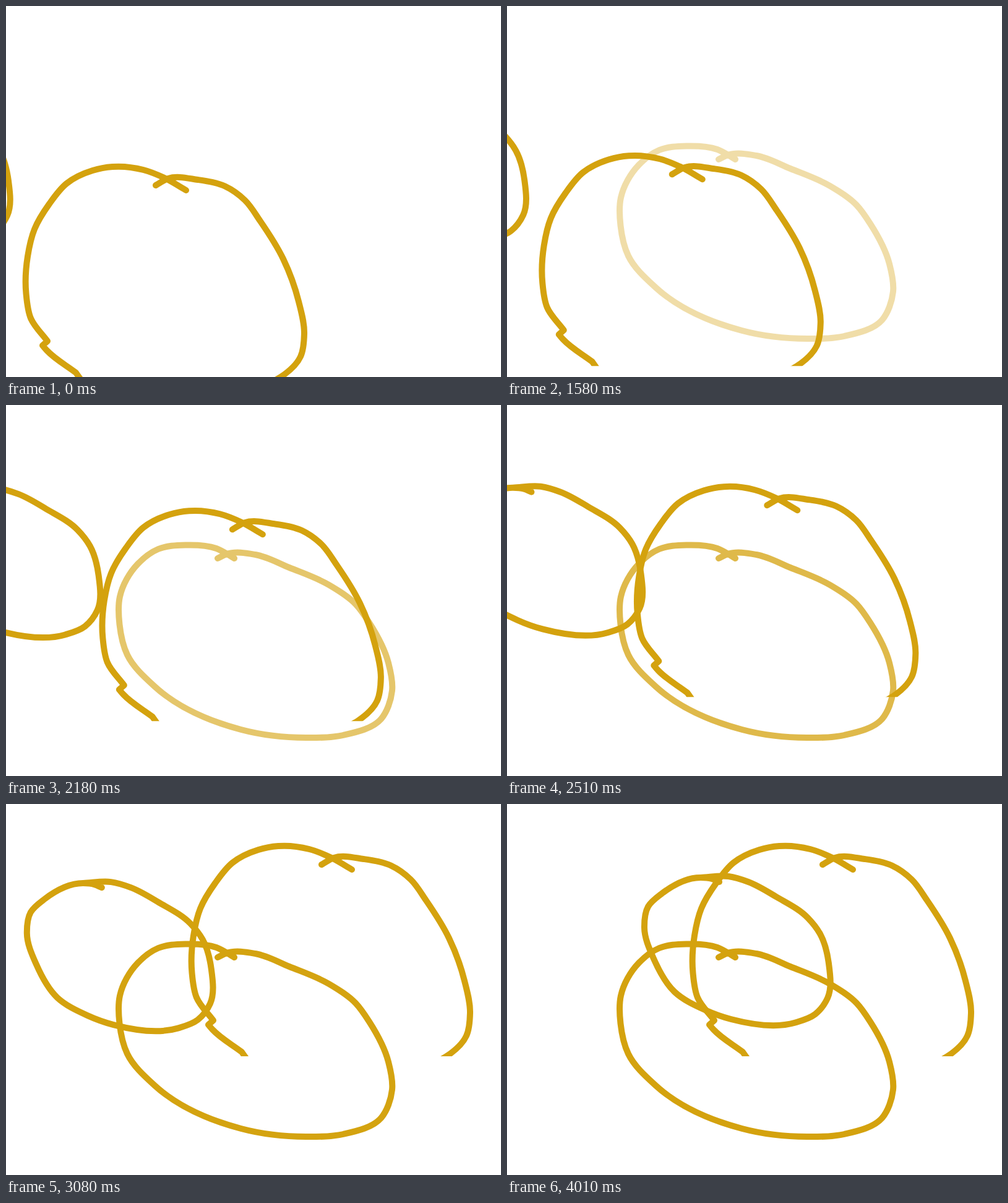
Animation of 800 by 600 pixels, one loop 4640 ms. Source, as an HTML page:

```html
<!DOCTYPE html>
<html lang="en">
<head>
<meta charset="utf-8">
<title>Three loops</title>
<style>
  html, body { margin: 0; width: 100%; height: 100%; overflow: hidden; background: #fff; }
  svg { display: block; width: 100%; height: 100%; }
  path { fill: none; stroke: #d4a20e; stroke-width: 10; stroke-linecap: round; stroke-linejoin: round; }
</style>
</head>
<body>
<svg viewBox="0 0 800 600">
  <clipPath id="page"><rect width="800" height="600"/></clipPath>
  <path id="fading"/>
  <path id="rising" clip-path="url(#page)"/>
  <path id="sliding"/>
</svg>
<script>
const LOOP = 4640;
const FADE_START = 890;
const MOVE_START = 1370;
const [fading, rising, sliding] = ['fading', 'rising', 'sliding'].map(id => document.getElementById(id));

const distance = (a, b) => Math.hypot(b[0] - a[0], b[1] - a[1]);
const direction = (a, b) => a.map((v, k) => (b[k] - v) / distance(a, b));

// Unit-speed tangent, weighted towards the nearer neighbour.
function tangent(points, i) {
  const [before, here, after] = [points[i - 1], points[i], points[i + 1]];
  if (!before) return direction(here, after);
  if (!after) return direction(before, here);
  const [a, b] = [distance(before, here), distance(here, after)];
  const [into, out] = [direction(before, here), direction(here, after)];
  return into.map((v, k) => (v * b + out[k] * a) / (a + b));
}

// Smooth curve through "x,y" key points; "|" separates strokes.
function drawStrokes(path, text) {
  const curves = text.split('|').map(part => {
    const points = part.trim().split(/\s+/).map(pair => pair.split(',').map(Number));
    return points.slice(1).reduce((d, to, i) => {
      const from = points[i];
      const reach = distance(from, to) / 3;
      const [leave, arrive] = [tangent(points, i), tangent(points, i + 1)];
      const c1 = from.map((v, k) => v + leave[k] * reach);
      const c2 = to.map((v, k) => v - arrive[k] * reach);
      return `${d}C${c1} ${c2} ${to}`;
    }, 'M' + points[0]);
  });
  path.setAttribute('d', curves.join(''));
}

drawStrokes(fading, `342,248 357,241 403,242 458,263 522,291 565,322 587,352 618,417 624,462 606,508
  545,534 485,538 380,525 240,455 196,404 183.5,355 184,310 213,257 246,233 290,226.5 340,232 369,248`);

drawStrokes(rising, `291,298 258,279 222,265 172,260 140,266 98,287 70,320 46,361 35,405 32.5,465
  40,505 67,542 | 67,542 59,549 | 59,549 66,557 113,593 | 113,593 120,603
  | 242,290 262,279 310,281 354,291.5 386,314 411,348 448,409 473,478 482,530 476,567 444,600 430,608`);

drawStrokes(sliding, `343,126 331,121 313,119 250,145 228,166 222,200 237,250 271,304 320,333 362,348
  466,353.5 498,340 518,314 520,258 506,210 486,184 435,150 390,126 358,117 313,119`);

const progress = (t, start, end) => Math.max(0, Math.min(1, (t - start) / (end - start)));
const move = (path, x, y) => path.setAttribute('transform', `translate(${x} ${y})`);

// Coarse steps while only the fade runs, fine steps once the loops move.
function stepTime(t) {
  if (t < FADE_START) return 0;
  const step = t < MOVE_START ? 150 : 30;
  return Math.max(FADE_START, MOVE_START + Math.floor((t - MOVE_START) / step) * step);
}

function draw() {
  const t = stepTime(performance.now() % LOOP);
  fading.setAttribute('opacity', progress(t, 710, 3110));
  const rise = progress(t, 1430, 3053);
  move(rising, 268 * rise, -192 * rise);
  const remaining = 1 - progress(t, 1460, 4010);
  move(sliding, -516 * remaining, 25 * remaining);
  requestAnimationFrame(draw);
}
draw();
</script>
</body>
</html>
```
